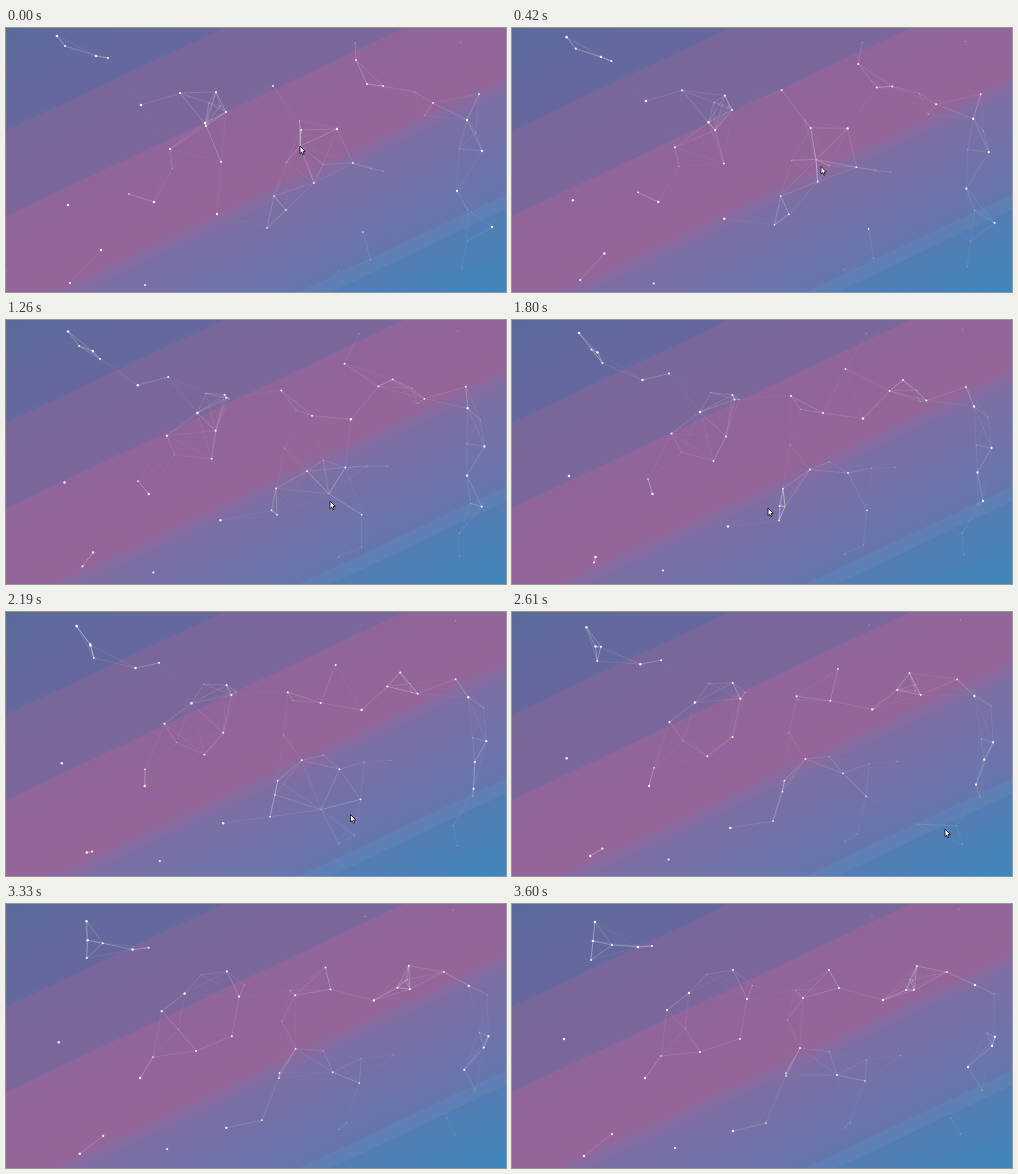
These frames come from a looping animation (500x264 px, 3700 ms). An HTML page with a canvas:

```html
<!DOCTYPE html>
<html lang="en">
<head>
<meta charset="utf-8">
<title>Particle network</title>
<style>
  html, body { margin: 0; width: 100%; height: 100%; overflow: hidden; }
  body {
    background: linear-gradient(154.7deg,
      #5a6a9d, #67689d 20.5%,
      #79679c 20.5%, #7c669b 37.6%,
      #92659a 37.6%, #936599 57.3%,
      #886ba0 57.3%, #866ca1 59.6%,
      #7d6ea3 59.6%, #6577ae 80.5%,
      #617fb4 80.5%, #5c80b5 83.5%,
      #527db4 83.5%, #3e86ba);
  }
  canvas { display: block; }
</style>
</head>
<body>
<canvas id="net" width="500" height="264"></canvas>
<script>
const W = 500, H = 264;
const ctx = document.getElementById("net").getContext("2d");

// The picture advances in 27 uneven steps
const steps = 27;
const shortSteps = new Set([1, 5, 7, 11, 12, 14, 15, 18, 22, 24]);
const hold = step => step === steps - 1 ? 100 : shortSteps.has(step) ? 120 : 150;
const loop = Array.from({ length: steps }, (_, i) => hold(i)).reduce((a, b) => a + b);

// Main dots, brightest first: start x, y and drift over one loop
const main = [
  [51, 8, 32, 10], [90, 28, -9, 9], [135, 77, -9, -34], [199, 95, -22, -6],
  [62, 177, -10, -42], [148, 174, -15, 0], [95, 222, -23, 30], [211, 186, 10, 41],
  [331, 101, 40, -5], [461, 92, 2, -11], [476, 123, 7, 10], [451, 163, 29, -21],
  [486, 199, -30, -36], [139, 257, 24, -13], [64, 255, 36, -25], [164, 121, -9, -15],
  [59, 18, 41, 23], [102, 30, -23, 26], [174, 65, -34, -23], [210, 64, 25, 31],
  [220, 84, 1, -18], [200, 98, 28, 37], [267, 58, 24, 36], [215, 134, -27, 14],
  [295, 102, 32, -18], [350, 32, -33, 34], [361, 56, 33, 30], [377, 58, 28, 4],
  [427, 75, -25, 11], [473, 66, -38, 2], [347, 135, -22, 36], [308, 155, -20, -11],
  [268, 168, 6, 1], [280, 182, -26, 37], [261, 200, 13, -28], [357, 204, -4, -27],
  [123, 166, 26, -14]
];

let seed = 7;
const random = () => (seed = seed * 16807 % 2147483647) / 2147483647;
const spread = size => (random() - 0.5) * size;

// Faint dots fill the gaps
const faint = Array.from({ length: 20 }, () =>
  [random() * W, random() * H, spread(60), spread(60)]);

const particles = [
  ...main.map((path, i) => ({ path, r: 1.3 - 0.5 * i / main.length, glow: 1 })),
  ...faint.map(path => ({ path, r: 0.5, glow: 0.5 }))
];

// Pointer route: step, x, y
const route = [[0, 294, 118], [5, 319, 152], [9, 324, 181], [13, 256, 188], [19, 433, 217]];
const routeEnd = 19;

const mix = (a, b, k) => a + (b - a) * k;

function stepAt(ms) {
  let step = 0;
  for (let t = ms % loop; t >= hold(step); step++) t -= hold(step);
  return step;
}

function pointerAt(step) {
  const s = Math.max(0, step);
  const n = Math.max(1, route.findIndex(p => p[0] >= s));
  const [a, b] = [route[n - 1], route[n]];
  const k = (s - a[0]) / (b[0] - a[0]);
  return { x: mix(a[1], b[1], k), y: mix(a[2], b[2], k) };
}

function link(a, b, reach, strength, falloff) {
  const near = 1 - Math.hypot(a.x - b.x, a.y - b.y) / reach;
  if (near <= 0) return;
  ctx.strokeStyle = `rgba(255,255,255,${strength * near ** falloff})`;
  ctx.beginPath();
  ctx.moveTo(a.x, a.y);
  ctx.lineTo(b.x, b.y);
  ctx.stroke();
}

function drawPointer({ x, y }) {
  ctx.save();
  ctx.translate(x, y);
  ctx.beginPath();
  [[0, 0], [0, 7.6], [1.7, 6.1], [2.9, 8.8], [4.1, 8.2], [3, 5.6], [5.3, 5.4]]
    .forEach(p => ctx.lineTo(...p));
  ctx.closePath();
  ctx.fillStyle = "#fff";
  ctx.fill();
  ctx.strokeStyle = "#1b1826";
  ctx.lineWidth = 0.9;
  ctx.stroke();
  ctx.restore();
}

function draw(step) {
  ctx.clearRect(0, 0, W, H);
  ctx.lineWidth = 0.7;
  const k = step / (steps - 1);
  const dots = particles.map(({ path: [x, y, dx, dy], r, glow }) =>
    ({ x: x + dx * k, y: y + dy * k, r, glow }));

  dots.forEach((a, i) => {
    for (const b of dots.slice(i + 1)) link(a, b, 65, 0.6 * a.glow * b.glow, 1.4);
  });

  // Links to the pointer trail it by one step
  const active = step <= routeEnd;
  if (active) {
    const grab = pointerAt(step - 1);
    for (const dot of dots) link(dot, grab, 60, 0.9 * dot.glow, 1);
  }

  for (const { x, y, r, glow } of dots) {
    ctx.fillStyle = `rgba(255,255,255,${0.9 * glow})`;
    ctx.beginPath();
    ctx.arc(x, y, r, 0, Math.PI * 2);
    ctx.fill();
  }
  if (active) drawPointer(pointerAt(step));
}

const start = performance.now();
function tick() {
  draw(stepAt(performance.now() - start));
  requestAnimationFrame(tick);
}
tick();
</script>
</body>
</html>
```
